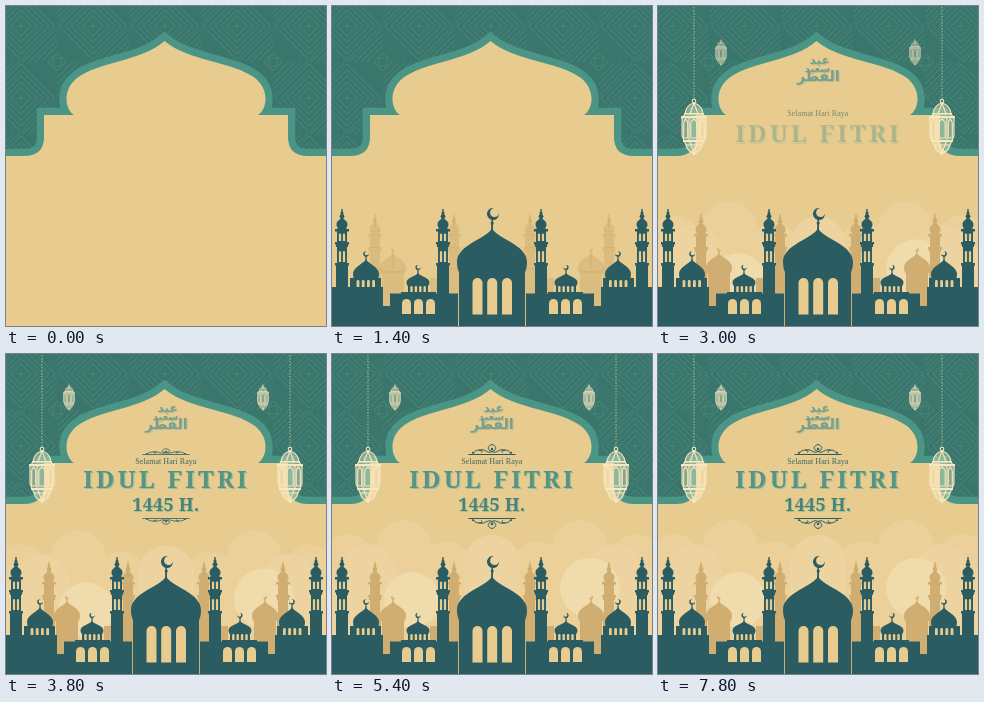
An HTML page with a canvas that plays this animation: 320x320 px, repeating every 8 s.

```html
<!DOCTYPE html>
<html lang="id">
<head>
<meta charset="utf-8">
<title>Idul Fitri</title>
<style>
html, body { margin: 0; width: 100%; height: 100%; overflow: hidden; background: #e8cb8f; }
canvas { display: block; width: 100vw; height: 100vh; }
</style>
</head>
<body>
<canvas id="stage" width="320" height="320"></canvas>
<script>
const ctx = document.getElementById('stage').getContext('2d');
const LOOP = 8000, STEP = 200, TAU = Math.PI * 2;
const SAND = '#e8cb8f', DARK = '#2b5c62', BACK = '#d0ad70', CREAM = '#f6e8bf';

const ramp = (t, a, b) => Math.min(1, Math.max(0, (t - a) / (b - a)));
const easeOut = (p, n = 3) => 1 - (1 - p) ** n;

function layer(alpha, dy, draw) {
  if (alpha <= 0) return;
  ctx.save();
  ctx.globalAlpha = alpha;
  ctx.translate(0, dy);
  draw();
  ctx.restore();
}

// Draws once, then again mirrored about the vertical centre line.
function mirrored(draw) {
  draw();
  ctx.save();
  ctx.translate(320, 0);
  ctx.scale(-1, 1);
  draw();
  ctx.restore();
}

function disc(x, y, r) {
  ctx.beginPath();
  ctx.arc(x, y, r, 0, TAU);
  ctx.fill();
}

function line(...p) {
  ctx.beginPath();
  for (let i = 0; i < p.length; i += 2) ctx.lineTo(p[i], p[i + 1]);
  ctx.stroke();
}

function diamond(x, y, r) {
  line(x - r, y, x, y - r, x + r, y, x, y + r, x - r, y);
}

function drawPattern() {
  ctx.fillStyle = '#3a766c';
  ctx.fillRect(0, 0, 320, 160);
  ctx.strokeStyle = '#4d8a7c';
  ctx.lineWidth = 0.8;
  for (let i = -1; i < 6; i++) {
    for (let j = -1; j < 4; j++) {
      const x = 15 + i * 72, y = 20 + j * 72;
      line(x - 4, y, x + 4, y);
      line(x, y - 4, x, y + 4);
      for (let r = 10; r <= 34; r += 6) diamond(x, y, r);
      const hx = x + 36, hy = y + 36;
      ctx.strokeRect(hx - 4, hy - 4, 8, 8);
      diamond(hx, hy, 9);
      for (let r = 16; r <= 34; r += 6) {
        line(hx - r, hy, hx, hy - r);
        line(hx, hy + r, hx + r, hy);
      }
    }
  }
}

function archPath() {
  const path = new Path2D();
  path.moveTo(-12, 340);
  path.lineTo(-12, 150);
  path.lineTo(18, 150);
  path.quadraticCurveTo(38, 150, 38, 131);
  path.lineTo(38, 109);
  path.lineTo(68, 109);
  path.bezierCurveTo(58, 102, 57, 83, 71, 72);
  path.bezierCurveTo(92, 56, 136, 55, 158.5, 35);
  path.bezierCurveTo(182, 55, 228, 56, 249, 72);
  path.bezierCurveTo(263, 83, 262, 102, 252, 109);
  path.lineTo(282, 109);
  path.lineTo(282, 131);
  path.quadraticCurveTo(282, 150, 302, 150);
  path.lineTo(332, 150);
  path.lineTo(332, 340);
  path.closePath();
  return path;
}

function drawFrame() {
  drawPattern();
  const path = archPath();
  ctx.lineWidth = 14.5;
  ctx.lineJoin = 'miter';
  ctx.strokeStyle = '#4a9585';
  ctx.stroke(path);
  ctx.fillStyle = SAND;
  ctx.fill(path);
}

function crescent(x, y, r) {
  ctx.save();
  ctx.translate(x, y);
  ctx.rotate(-Math.PI / 4);
  ctx.beginPath();
  ctx.arc(0, 0, r, 0.6, TAU - 0.6);
  ctx.arc(r * 0.35, 0, r * 0.738, -0.872, 0.872, true);
  ctx.fill();
  ctx.restore();
}

function onion(x, top, half, base) {
  const h = base - top;
  ctx.beginPath();
  for (const s of [-1, 1]) {
    ctx.moveTo(x, top);
    ctx.bezierCurveTo(x + s * half * 0.12, top + h * 0.22, x + s * half, top + h * 0.35, x + s * half, top + h * 0.72);
    ctx.quadraticCurveTo(x + s * half, top + h * 0.9, x + s * half * 0.9, base);
    ctx.lineTo(x, base);
  }
  ctx.fill();
  ctx.fillRect(x - 0.6, top - 4, 1.2, h);
}

function slot(x, top, w, bottom) {
  const r = w / 2;
  ctx.beginPath();
  ctx.moveTo(x - r, bottom);
  ctx.lineTo(x - r, top + r);
  ctx.arc(x, top + r, r, Math.PI, TAU);
  ctx.lineTo(x + r, bottom);
  ctx.fill();
}

function minaret(x, top, color, windows) {
  const bar = (y, half, h) => ctx.fillRect(x - half, top + y, half * 2, h);
  ctx.fillStyle = color;
  bar(0, 0.7, 8);
  disc(x, top + 4, 1.5);
  disc(x, top + 7.5, 2.4);
  onion(x, top + 8, 5.5, top + 18);
  bar(17, 4.5, 4);
  bar(20, 7, 2.5);
  bar(22, 5, 12);
  bar(33, 7, 2.5);
  bar(35, 6, 3);
  bar(38, 5, 17);
  bar(54, 7, 2.5);
  bar(56, 6, 60);
  if (!windows) return;
  ctx.fillStyle = SAND;
  for (const s of [-2, 2]) {
    slot(x + s, top + 24.5, 2.2, top + 32);
    slot(x + s, top + 42, 2.2, top + 53);
  }
}

function drawBackCity() {
  mirrored(() => {
    minaret(43, 208, BACK);
    minaret(122, 208, BACK);
    onion(61, 247, 13, 267);
    crescent(61, 243.5, 2);
    ctx.fillRect(50, 265, 22, 40);
    ctx.fillRect(98, 272, 12, 30);
  });
}

function drawFrontCity() {
  mirrored(() => {
    minaret(10, 203, DARK, true);
    minaret(111, 203, DARK, true);
    ctx.fillStyle = DARK;
    ctx.fillRect(0, 281, 51, 50);
    ctx.fillRect(18, 272, 31, 20);
    ctx.fillRect(46, 300, 80, 30);
    ctx.fillRect(58, 287.5, 68, 40);
    onion(34, 253, 13, 274);
    crescent(34, 248, 2.8);
    onion(86, 267, 11.5, 280);
    crescent(86, 261.5, 2.6);
    ctx.fillRect(76, 278, 20, 12);
    ctx.fillRect(69, 286, 35, 5);
    ctx.fillStyle = SAND;
    for (let i = 0; i < 4; i++) {
      slot(26 + i * 5.2, 274, 2.8, 281);
      slot(79.5 + i * 4.4, 280, 2.4, 286);
    }
    for (const x of [74.5, 86.5, 98.5]) slot(x, 293, 9, 308);
  });
  ctx.fillStyle = DARK;
  onion(160, 222, 35, 269);
  ctx.fillRect(159.4, 213, 1.6, 14);
  disc(160.2, 217, 1.6);
  crescent(161, 208, 6);
  ctx.fillRect(127, 266, 66, 60);
  ctx.fillStyle = SAND;
  for (const x of [145.5, 160.2, 175]) slot(x, 272, 10, 308.5);
}

function drawClouds() {
  const puff = (x, y, r) => {
    disc(x, y, r);
    ctx.fillRect(x - r, y, r * 2, 140);
  };
  ctx.fillStyle = '#ecd09a';
  mirrored(() => {
    puff(16, 206, 26);
    puff(72, 194, 28);
    puff(115, 212, 25);
  });
  ctx.fillStyle = '#edd39f';
  puff(160, 209, 28);
  mirrored(() => {
    puff(36, 218, 28);
    puff(5, 238, 24);
  });
  ctx.fillStyle = '#efdbac';
  disc(80, 246, 28);
  disc(258, 234, 30);
}

function chain(x, bottom) {
  ctx.save();
  ctx.strokeStyle = '#c8d2a8';
  ctx.lineWidth = 0.8;
  ctx.setLineDash([1.5, 1.5]);
  line(x, -35, x, bottom);
  ctx.restore();
}

function lantern(x, y, k) {
  ctx.save();
  ctx.translate(x, y);
  ctx.scale(k, k);
  ctx.fillStyle = ctx.strokeStyle = CREAM;
  ctx.lineWidth = 1.1;
  ctx.beginPath();
  ctx.arc(0, -27, 1.8, 0, TAU);
  ctx.stroke();
  // glass
  const glass = new Path2D('M-9-14Q-8-23 0-25Q8-23 9-14L12-10L12 8L8 17Q6 24 0 25Q-6 24-8 17L-12 8L-12-10Z');
  ctx.save();
  ctx.globalAlpha *= 0.4;
  ctx.fill(glass);
  ctx.restore();
  ctx.stroke(glass);
  // cap ribs and ledges
  line(-4, -14, 0, -25, 4, -14);
  ctx.fillRect(-10, -15, 20, 1.6);
  ctx.fillRect(-13, -12, 26, 2.2);
  ctx.fillRect(-11, 12, 22, 2);
  // panels
  line(-5, -10, -5, 12);
  line(5, -10, 5, 12);
  for (const c of [-8.3, 0, 8.3]) {
    const w = c ? 2 : 3.2;
    ctx.beginPath();
    ctx.moveTo(c - w, 10);
    ctx.lineTo(c - w, -4);
    ctx.quadraticCurveTo(c - w, -7, c, -9);
    ctx.quadraticCurveTo(c + w, -7, c + w, -4);
    ctx.lineTo(c + w, 10);
    ctx.closePath();
    ctx.stroke();
  }
  // foot
  line(-8, 17, 8, 17);
  line(-4, 14, 0, 25, 4, 14);
  disc(0, 25.5, 1.5);
  ctx.restore();
}

function text(str, x, y, font, color, spacing = 0) {
  ctx.font = font;
  ctx.letterSpacing = spacing + 'px';
  ctx.textAlign = 'center';
  ctx.fillStyle = color;
  ctx.fillText(str, x + spacing / 2, y);
  ctx.letterSpacing = '0px';
}

function drawCalligraphy() {
  const face = (d, color) => {
    const word = (str, x, y, size) =>
      text(str, x + d, y + d, `bold ${size}px "DejaVu Sans", sans-serif`, color);
    word('عيد', 161, 58, 12);
    word('سعيد', 161, 66, 10);
    word('الفطر', 160, 75, 14);
  };
  face(1.2, '#b9bd95');
  face(0, '#7a9f8c');
}

function drawOrnament(y, dir) {
  ctx.save();
  ctx.translate(160, y);
  ctx.scale(1, dir);
  ctx.strokeStyle = ctx.fillStyle = DARK;
  ctx.lineWidth = 1;
  line(-23.5, 0, 23.5, 0);
  for (const s of [-1, 1]) {
    ctx.beginPath();
    ctx.moveTo(s * 19, -1);
    ctx.bezierCurveTo(s * 15, -7, s * 7, -4, s * 11, -2);
    ctx.moveTo(s * 13, -4);
    ctx.bezierCurveTo(s * 7, -7, s * 5, 0, 0, -3);
    ctx.bezierCurveTo(s * 6, -5, s * 4, -9, 0, -10);
    ctx.stroke();
    disc(s * 19, -1.8, 1);
  }
  disc(0, -5.5, 1.2);
  ctx.restore();
}

function drawTitle() {
  const font = '900 24px "Noto Serif", serif';
  text('IDUL FITRI', 160.2, 135.2, font, '#a3bb97', 3.2);
  text('IDUL FITRI', 159, 134, font, '#569484', 3.2);
}

function drawYear() {
  const font = '900 18px "Noto Serif", serif';
  text('1445 H.', 160.6, 157.8, font, '#a9bd95', 0.3);
  text('1445 H.', 159.7, 157, font, '#468477', 0.3);
}

function render(t) {
  ctx.clearRect(0, 0, 320, 320);
  drawFrame();

  const rise = 85 * (1 - easeOut(ramp(t, 1600, 5000), 2));
  layer(ramp(t, 1400, 2200), rise, drawClouds);
  layer(ramp(t, 1000, 1800), 0, drawBackCity);
  if (t > 0) layer(1, 125 * (1 - easeOut(ramp(t, 0, 1200))), drawFrontCity);

  const big = ramp(t, 2000, 2800), small = ramp(t, 2400, 3200);
  layer(big, 32 * (1 - big), () => mirrored(() => {
    chain(36, 93);
    lantern(36, 122, 1);
  }));
  layer(small, 12 * (1 - small), () => mirrored(() => lantern(63, 44, 0.46)));

  const reveal = (start, draw) => {
    const p = ramp(t, start, start + 600);
    layer(p, 8 * (1 - easeOut(p)), draw);
  };
  reveal(2400, drawCalligraphy);
  reveal(2600, () =>
    text('Selamat Hari Raya', 159.8, 110, '8.1px "Liberation Serif", serif', '#3b6a62'));
  reveal(2800, drawTitle);
  reveal(3000, drawYear);

  const unfold = ramp(t, 3000, 4400);
  layer(ramp(t, 3000, 3600), 0, () => {
    drawOrnament(100.5, unfold);
    drawOrnament(164.5, -unfold);
  });
}

const start = performance.now();
function tick() {
  const t = (performance.now() - start) % LOOP;
  render(Math.floor(t / STEP) * STEP);
  requestAnimationFrame(tick);
}
tick();
</script>
</body>
</html>
```
